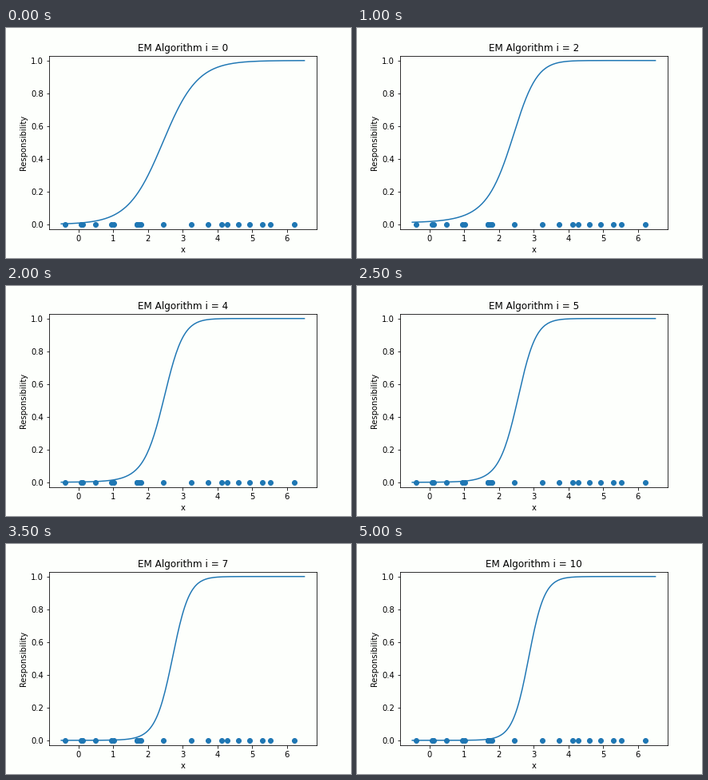
Recreate the animation shown at these times as a matplotlib script. Size 432x288 px, loop 5500 ms.

```python
import numpy as np
import matplotlib.pyplot as plt
from matplotlib.animation import FuncAnimation

STEPS = 11
BG = "#fdfffc"

DATA = np.array([
    -0.39, 0.12, 0.94, 1.67, 1.76, 2.44, 3.72, 4.28, 4.92, 5.53,
    0.06, 0.48, 1.01, 1.68, 1.80, 3.25, 4.12, 4.60, 5.28, 6.22,
])


def responsibility(x, mu, var, pi):
    """Posterior probability of each of the two components at x."""
    x = np.asarray(x)[:, None]
    dens = pi * np.exp(-(x - mu) ** 2 / (2 * var)) / np.sqrt(var)
    return dens / dens.sum(axis=1, keepdims=True)


def em_step(mu, var, pi):
    r = responsibility(DATA, mu, var, pi)
    n = r.sum(axis=0)
    # The spread is taken around the means of the previous step.
    new_var = (r * (DATA[:, None] - mu) ** 2).sum(axis=0) / n
    new_mu = DATA @ r / n
    return new_mu, new_var, n / len(DATA)


grid = np.linspace(-0.5, 6.5, 200)
params = np.array([1.0, 3.0]), np.array([1.0, 1.0]), np.array([0.7, 0.3])
curves = []
for _ in range(STEPS):
    curves.append(responsibility(grid, *params)[:, 1])
    params = em_step(*params)

plt.rcParams.update({"font.family": "DejaVu Sans", "font.size": 10})
fig, ax = plt.subplots(figsize=(6, 4), dpi=72, facecolor=BG)
fig.subplots_adjust(left=0.125, right=0.9, bottom=0.125, top=0.88)
ax.set_facecolor(BG)

ax.scatter(DATA, np.zeros_like(DATA), color="C0")
line, = ax.plot(grid, curves[0], color="C0")
title = ax.set_title("EM Algorithm i = 0")
ax.set_xlabel("x")
ax.set_ylabel("Responsibility")
ax.set_xlim(-0.85, 6.85)
ax.set_ylim(-0.03, 1.03)
ax.set_xticks(range(7))


def draw(i):
    line.set_ydata(curves[i])
    title.set_text(f"EM Algorithm i = {i}")
    return line, title


anim = FuncAnimation(fig, draw, frames=STEPS, interval=500,
                     repeat=True, repeat_delay=0, blit=False)
plt.show()
```
